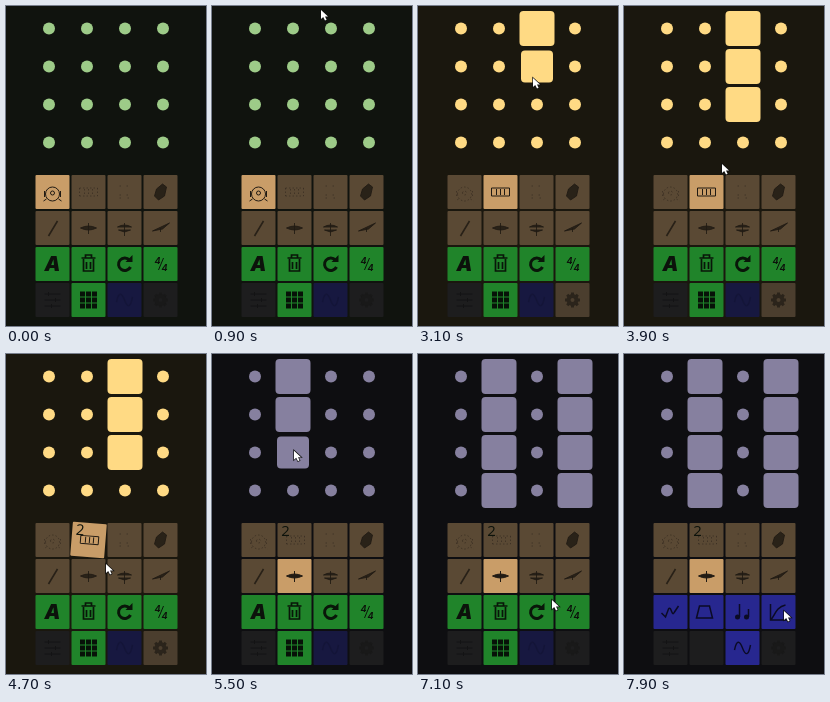
An HTML page with a canvas for the animation above (8 s loop, 200 by 320 pixels).

```html
<!DOCTYPE html>
<html lang="en">
<head>
<meta charset="utf-8">
<title>Drum grid</title>
<style>
html, body { margin: 0; width: 100%; height: 100%; overflow: hidden; background: #10130e; }
canvas { display: block; width: 200px; height: 320px; }
</style>
</head>
<body>
<canvas id="stage"></canvas>
<script>
const LOOP = 8000, STEP = 200, FIRST = 500;
const canvas = document.getElementById('stage');
const ctx = canvas.getContext('2d');
const ratio = window.devicePixelRatio || 1;
canvas.width = 200 * ratio;
canvas.height = 320 * ratio;

const KICK = 0, SNARE = 1, HAT = 5;
const themes = [
  { from: 0, tile: KICK, back: '#10130e', pad: '#9dcb88' },
  { from: 2500, tile: SNARE, back: '#1a170e', pad: '#ffda84' },
  { from: 4900, tile: HAT, back: '#0e0e11', pad: '#86809f' }
];

// Each run fills one column from top to bottom.
const runs = [
  { theme: 0, col: 0, start: 1300, count: 4 },
  { theme: 1, col: 2, start: 2900, count: 3 },
  { theme: 2, col: 1, start: 5100, count: 4 },
  { theme: 2, col: 3, start: 5900, count: 4 }
];

const route = [
  [900, 109, 4], [1100, 64, 13], [1300, 44, 22], [1900, 44, 136],
  [2300, 77, 181], [2500, 80, 184], [2900, 117, 28], [3100, 115, 72],
  [3300, 118, 99], [3700, 112, 132], [4100, 84, 184], [4500, 84, 184],
  [4700, 100, 210], [4900, 83, 222], [5100, 82, 22], [5700, 82, 134],
  [5900, 156, 22], [6500, 157, 129], [6900, 148, 200], [7300, 120, 292],
  [7700, 121, 291], [7900, 160, 257]
];
const BADGE = 4500, MENU = 7700;

// Icons are drawn around the middle of a tile.
const shape = d => new Path2D(d);
const icons = {
  kick: shape('M-7 2A7 7 0 1 1 7 2A7 7 0 1 1-7 2M-2 1A2 2 0 1 1 2 1A2 2 0 1 1-2 1M-6 7L-9 9M6 7L9 9M-8-1V5M8-1V5'),
  snare: shape('M-9-4H9M-9 4H9M-9-4V4M-4-3V3M0-3V3M4-3V3M9-4V4'),
  clap: shape('M-5-6H-2M2-6H5M-5 3H-2M2 3H5M-5 6H-3M3 6H5'),
  shaker: shape('M-4-3L2-8L6-5L4 4L-2 8L-6 4Z'),
  stick: shape('M-4 8L5-7'),
  hat: shape('M-8 0Q0-4 8 0Q0 4-8 0ZM0-5V6'),
  openHat: shape('M-7-1Q0-5 7-1ZM-6 2H6L0 4ZM0-5V8'),
  ride: shape('M-8 3L9-5L2 1ZM0 0V4'),
  trash: shape('M-7-6H7M-3-6V-9H3V-6M-5-5V7H5V-5M-2-2V5M2-2V5'),
  redo: shape('M5-4A6.3 6.3 0 1 0 6 3'),
  arrow: shape('M1-2H8V-9Z'),
  sliders: shape('M-8-6H8M-8 0H8M-8 6H8M-4-8V-4M3-2V2M-1 4V8'),
  wave: shape('M-8 2C-6-8-3-8 0 0S6 8 8-3'),
  steps: shape('M-9 1L-5 5L-2-3C1-7 1 6 4 0L8-6'),
  envelope: shape('M-10 6L-7-6H3L6 6Z'),
  notes: shape('M-3 5V-8M6 5V-3'),
  curve: shape('M-8-8V8H9M-8 8C-4 5-3-5 7-7'),
  pointer: shape('M0 0V9L2.2 7L4 10.5L5.6 9.7L4 6.5H7Z')
};
const pads = ['kick', 'snare', 'clap', 'shaker', 'stick', 'hat', 'openHat', 'ride'];
const faint = ['kick', 'snare', 'clap'];
const solid = ['shaker', 'hat', 'openHat', 'ride'];

function at(x, y, draw, angle = 0) {
  ctx.save();
  ctx.translate(x, y);
  ctx.rotate(angle);
  draw();
  ctx.restore();
}

function box(x, y, size, radius, color) {
  ctx.fillStyle = color;
  ctx.beginPath();
  ctx.roundRect(x - size / 2, y - size / 2, size, size, radius);
  ctx.fill();
}

function line(name, color = '#15130f', width = 1.2) {
  ctx.strokeStyle = color;
  ctx.lineWidth = width;
  ctx.stroke(icons[name]);
}

function fill(name, color = '#211b14') {
  ctx.fillStyle = color;
  ctx.fill(icons[name]);
}

function label(text, x, y, font) {
  ctx.fillStyle = '#0c120b';
  ctx.font = font;
  ctx.textAlign = 'center';
  ctx.textBaseline = 'middle';
  ctx.fillText(text, x, y);
}

function tile(index, color, draw, angle) {
  const x = 46.5 + index % 4 * 36, y = 186 + Math.floor(index / 4) * 36;
  at(x, y, () => {
    box(0, 0, 34, 1, color);
    draw();
  }, angle);
}

function drawPads(time, theme) {
  pads.forEach((name, i) => {
    const on = theme.tile === i;
    const tilted = i === SNARE && time >= BADGE && time < BADGE + 400;
    tile(i, on ? '#c99d68' : '#5a4934', () => {
      const badge = i === SNARE && time >= BADGE;
      ctx.globalAlpha = on ? 1 : faint.includes(name) ? 0.42 : 0.85;
      if (!on && faint.includes(name)) ctx.setLineDash([1.5, 2]);
      at(badge ? 1 : 0, 0, () => {
        if (solid.includes(name)) fill(name);
        line(name, '#201a13', name === 'stick' ? 1.6 : 1);
      });
      ctx.setLineDash([]);
      ctx.globalAlpha = 1;
      if (badge) label('2', -9, -8, '15px "Open Sans", sans-serif');
    }, tilted ? 0.08 : 0);
  });
}

function drawGrid() {
  for (let i = 0; i < 9; i++) {
    box(i % 3 * 6 - 6, Math.floor(i / 3) * 6 - 6, 5, 0, '#071208');
  }
}

function drawGear(color) {
  for (let i = 0; i < 8; i++) {
    at(0, 0, () => box(0, -6, 3, 0, color), i * Math.PI / 4);
  }
  ctx.strokeStyle = color;
  ctx.lineWidth = 4;
  ctx.beginPath();
  ctx.arc(0, 0, 4, 0, 7);
  ctx.stroke();
}

function drawTools(time, theme) {
  const green = '#20842a', blue = '#27278f', grey = '#1d1d1e';
  const menu = time >= MENU;
  if (menu) {
    ['steps', 'envelope', 'notes', 'curve'].forEach((name, i) => tile(8 + i, blue, () => {
      line(name, '#0b0b25', 1.5);
      if (name === 'notes') {
        at(-5, 5, () => box(0, 0, 5, 2.5, '#0b0b25'));
        at(4, 5, () => box(0, 0, 5, 2.5, '#0b0b25'));
      }
    }));
  } else {
    tile(8, green, () => label('A', 0, 1, 'italic 900 20px Inter, sans-serif'));
    tile(9, green, () => line('trash', '#091609', 1.7));
    tile(10, green, () => {
      line('redo', '#091609', 3);
      fill('arrow', '#091609');
    });
    tile(11, green, () => {
      label('4', -3, -3, 'italic bold 9px Inter, sans-serif');
      label('4', 4, 4, 'italic bold 9px Inter, sans-serif');
      ctx.strokeStyle = '#091609';
      ctx.lineWidth = 1;
      ctx.beginPath();
      ctx.moveTo(-2, 6);
      ctx.lineTo(3, -6);
      ctx.stroke();
    });
  }
  tile(12, grey, () => line('sliders', '#131314', 1));
  tile(13, menu ? grey : green, () => { if (!menu) drawGrid(); });
  tile(14, menu ? blue : '#171840', () => line('wave', menu ? '#0b0b25' : '#141538', 1.4));
  const warm = theme === themes[1];
  tile(15, warm ? '#4b3e2e' : grey, () => drawGear(warm ? '#2b241b' : '#191919'));
}

function drawCells(time, theme) {
  for (let i = 0; i < 16; i++) {
    const col = i % 4, row = Math.floor(i / 4);
    const x = 43 + col * 38, y = 22.6 + row * 38;
    const run = runs.find(r => themes[r.theme] === theme && r.col === col && row < r.count);
    const age = run ? time - run.start - row * STEP : -1;
    if (age < 0) {
      box(x, y, 12, 6, theme.pad);
      continue;
    }
    const pressed = col === 3 && row === 3 && age < STEP;
    box(x, y, pressed ? 39 : age < STEP ? 32 : 35, 4, theme.pad);
    if (pressed) {
      ctx.strokeStyle = '#49382c';
      ctx.lineWidth = 2;
      ctx.beginPath();
      ctx.roundRect(x - 15, y - 15, 30, 30, 3);
      ctx.stroke();
    }
  }
}

function drawPointer(time) {
  if (time < route[0][0]) return;
  let i = route.findIndex(p => p[0] > time);
  if (i < 0) i = route.length - 1;
  const [t0, x0, y0] = route[i - 1], [t1, x1, y1] = route[i];
  const k = Math.min(1, (time - t0) / (t1 - t0));
  at(x0 + (x1 - x0) * k, y0 + (y1 - y0) * k, () => {
    line('pointer', '#111', 1.4);
    fill('pointer', '#fff');
  });
}

function draw(now) {
  const clock = now % LOOP;
  const time = clock < FIRST ? 0 : FIRST + Math.floor((clock - FIRST) / STEP) * STEP;
  const theme = themes.findLast(item => item.from <= time);
  ctx.setTransform(ratio, 0, 0, ratio, 0, 0);
  ctx.fillStyle = theme.back;
  ctx.fillRect(0, 0, 200, 320);
  drawCells(time, theme);
  drawTools(time, theme);
  drawPads(time, theme);
  drawPointer(time);
}

const began = performance.now();
function tick() {
  draw(performance.now() - began);
  requestAnimationFrame(tick);
}
tick();
</script>
</body>
</html>
```
